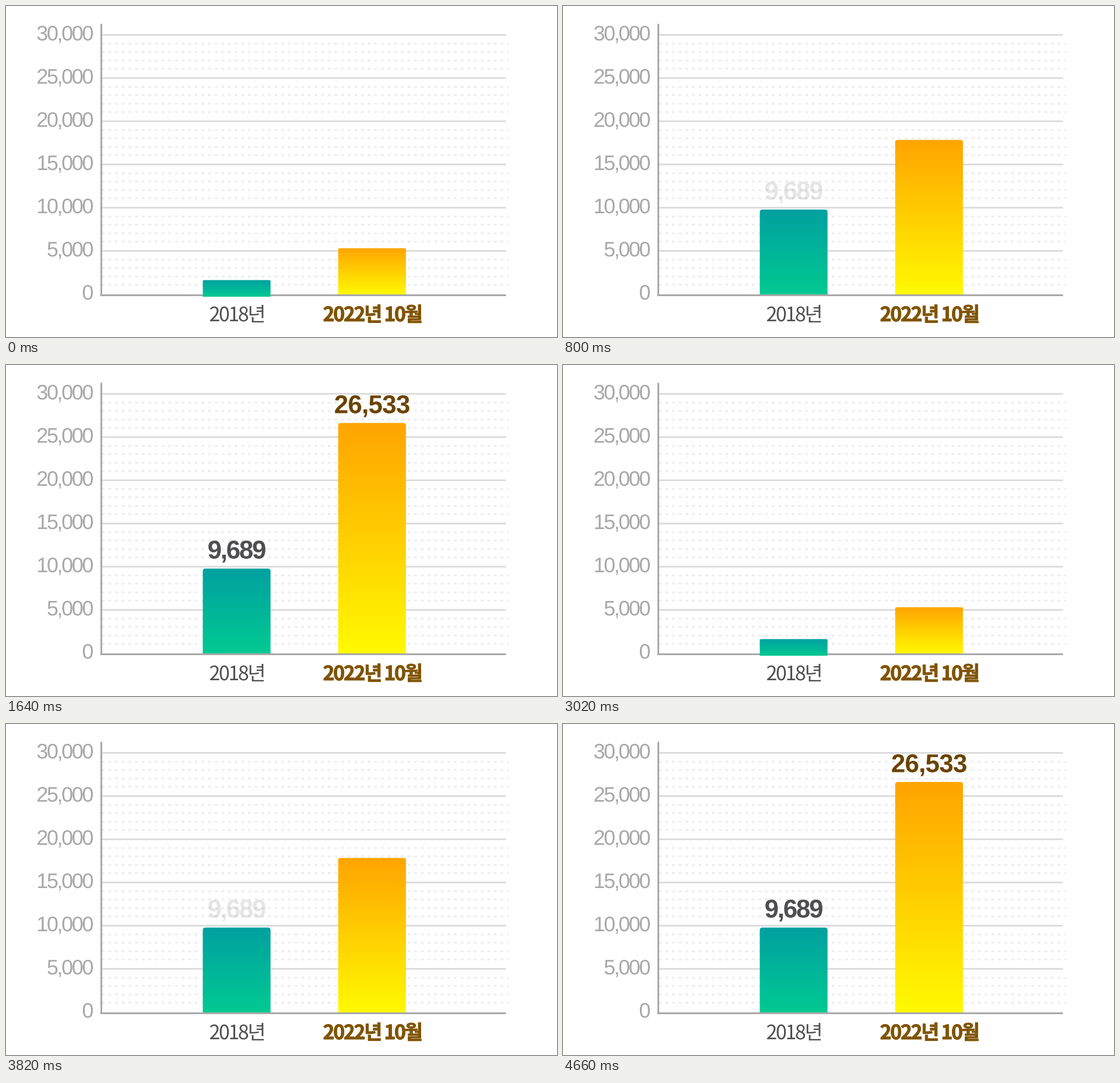
Animation of 945 by 567 pixels, one loop 6000 ms. Source, as a matplotlib script:

```python
import numpy as np
import matplotlib.pyplot as plt
from matplotlib.animation import FuncAnimation
from matplotlib.colors import to_rgb
from matplotlib.patches import PathPatch
from matplotlib.path import Path
from matplotlib.textpath import TextPath
from matplotlib.transforms import Affine2D

W, H = 945, 567
DPI = 189              # divides both sides evenly
PX = 72 / DPI          # points per pixel
STEP = 20              # ms per frame
FRAMES = 300
CYCLE = 151            # frames before the bars start over

GREY, DARK = "#a8a8a8", "#4f4f51"
SANS, CJK = "Liberation Sans", "Noto Sans CJK JP"

fig = plt.figure(figsize=(W / DPI, H / DPI), dpi=DPI, facecolor="white")
ax = fig.add_axes([0, 0, 1, 1])
ax.set_xlim(0, W)
ax.set_ylim(H, 0)
ax.axis("off")


def line(xs, ys, color, width=3, **kw):
    kw.setdefault("solid_capstyle", "butt")
    ax.plot(xs, ys, color=color, lw=width * PX, **kw)


def tracked_path(s, size, tracking, font):
    """Outline of s with letter spacing in pixels, baseline at y = 0."""
    def outline(t):
        return TextPath((0, 0), t, size=size, prop=font)

    pair = outline("HH").get_extents().width
    x, parts = 0, []
    for ch in s:
        if ch != " ":
            parts.append(outline(ch).transformed(Affine2D().translate(x, 0)))
        x += outline("H" + ch + "H").get_extents().width - pair + tracking
    return Path.make_compound_path(*parts)


def label(s, x, y, size, color, tracking=0.0, family=SANS, weight="normal",
          align="center", stroke=0):
    path = tracked_path(s, size, tracking, {"family": family, "weight": weight})
    box = path.get_extents()
    anchor = box.x1 if align == "right" else (box.x0 + box.x1) / 2
    place = Affine2D().translate(-anchor, 0).scale(1, -1).translate(x, y)
    patch = PathPatch(path.transformed(place), facecolor=color, zorder=6,
                      edgecolor=color if stroke else "none", lw=stroke * PX)
    ax.add_patch(patch)
    return patch


def smooth(t, start, end):
    u = min(max((t - start) / (end - start), 0), 1)
    return u * u * (3 - 2 * u)


class Bar:
    """Gradient bar with rounded top corners that grows by vertical scaling."""

    def __init__(self, x0, x1, tops, bottoms, colors, span):
        self.x0, self.x1 = x0, x1
        self.tops, self.bottoms, self.span = tops, bottoms, span
        a, b = (np.array(to_rgb(c)) for c in colors)
        shade = a + (b - a) * np.linspace(0, 1, 256)[:, None, None]
        self.image = ax.imshow(shade, aspect="auto", interpolation="bilinear",
                               extent=(x0, x1, bottoms[1], tops[1]), zorder=5)

    def update(self, t):
        p = smooth(t, *self.span)
        top = self.tops[0] + (self.tops[1] - self.tops[0]) * p
        bottom = self.bottoms[0] + (self.bottoms[1] - self.bottoms[0]) * p
        scale = (bottom - top) / (self.bottoms[1] - self.tops[1])
        r, ry = 4.5, 4.5 * scale
        x0, x1 = self.x0, self.x1
        points = [(x0, bottom), (x0, top + ry), (x0, top), (x0 + r, top),
                  (x1 - r, top), (x1, top), (x1, top + ry), (x1, bottom),
                  (x0, bottom)]
        codes = [Path.MOVETO, Path.LINETO, Path.CURVE3, Path.CURVE3,
                 Path.LINETO, Path.CURVE3, Path.CURVE3, Path.LINETO,
                 Path.CLOSEPOLY]
        self.image.set_extent((x0 - 1, x1 + 1, bottom + 1, top - 1))
        self.image.set_clip_path(Path(points, codes), ax.transData)


# Grid, axes and scale
for i in range(7):
    y = 48.5 + 74 * i
    label(f"{30000 - 5000 * i:,}", 149, y + 10.5, 36, GREY, -2.4, align="right")
    if i == 6:
        break
    line([163, 857], [y, y], "#dddddd", zorder=2)
    for k in range(1, 5):
        ym = y + 0.5 + 14.5 * k
        line([165, 861], [ym, ym], "#ececec", zorder=1,
             dashes=(0.8, 3.0), dash_capstyle="round")
line([162.5, 162.5], [30, 496], GREY, zorder=3)
line([161, 857], [494.5, 494.5], GREY, zorder=3)

label("2018년", 396, 540, 34, DARK, -2.4, CJK)
label("2022년 10월", 628.5, 540, 34, "#805300", -2.4, CJK, "bold", stroke=0.9)

bars = [
    Bar(337.5, 453.7, (469.5, 348.7), (498, 494),
        ("#00a0a0", "#00ca92"), (0, 680)),
    Bar(569.7, 685.9, (415, 99.3), (494, 494),
        ("#ffa400", "#fffa00"), (420, 1100)),
]
values = [
    (label("9,689", 396, 331.5, 44, DARK, -2.3, weight="bold"), (700, 1120)),
    (label("26,533", 628, 82.5, 44, "#6a4400", -0.8, weight="bold"), (1200, 1640)),
]


def update(n):
    t = n % CYCLE * STEP
    for bar in bars:
        bar.update(t)
    for patch, span in values:
        patch.set_alpha(smooth(t, *span))
    return []


anim = FuncAnimation(fig, update, frames=FRAMES, interval=STEP, repeat=True)
plt.show()
```
